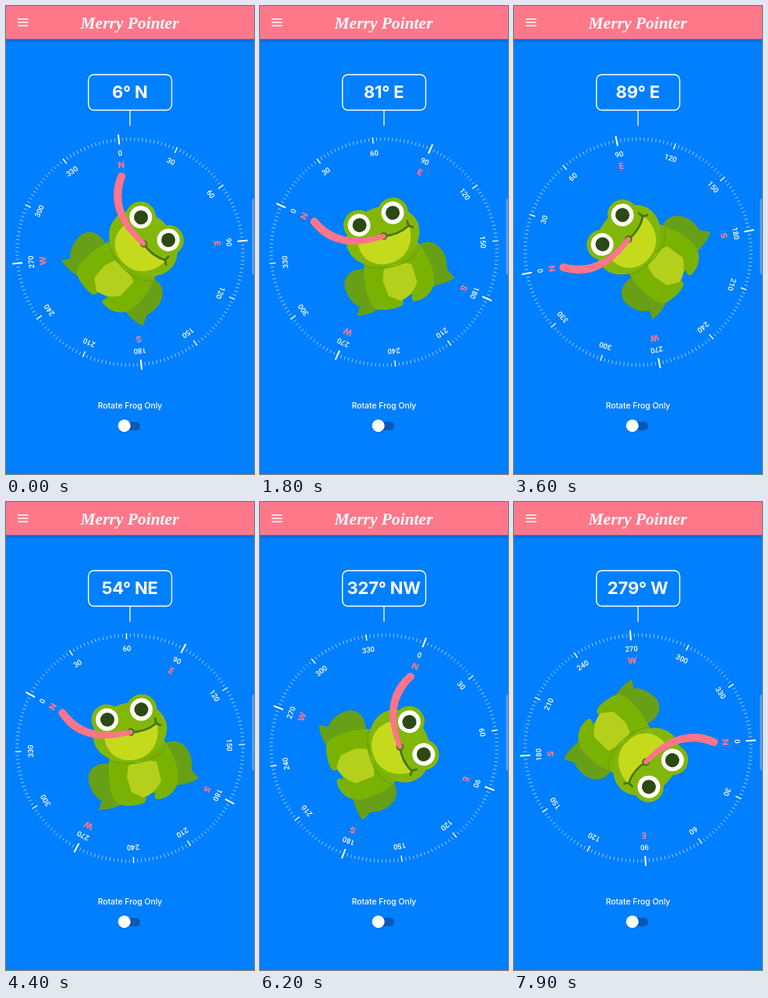
Animation of 318x600 px, one loop 8 s. Source, as an HTML page:

```html
<!DOCTYPE html>
<html lang="en">
<head>
<meta charset="utf-8">
<title>Merry Pointer</title>
<style>
html, body { margin: 0; width: 100%; height: 100%; overflow: hidden; background: #007fff; }
svg { display: block; width: 318px; height: 600px; }
text { text-anchor: middle; fill: #fff; font-family: Inter, sans-serif; }
.title { font: italic bold 21.5px "Liberation Serif", serif; }
.heading { font-size: 22px; font-weight: 700; letter-spacing: -.2px; }
.caption { font-size: 10.4px; font-weight: 500; }
.degree { font: 500 9.5px Roboto, sans-serif; }
.cardinal { font-size: 11px; font-weight: 800; fill: #ff758a; }
</style>
</head>
<body>
<svg viewBox="0 0 318 600">
  <defs>
    <linearGradient id="shade" x2="0" y2="1">
      <stop stop-color="#003f8c" stop-opacity=".55"/>
      <stop offset="1" stop-color="#003f8c" stop-opacity="0"/>
    </linearGradient>
  </defs>
  <rect width="318" height="600" fill="#007fff"/>
  <rect y="42" width="318" height="5" fill="url(#shade)"/>
  <rect width="318" height="42.5" fill="#ff788a"/>
  <path d="M15 16.8h13.5M15 21h13.5M15 25.2h13.5" stroke="#fff" stroke-width="1.5"/>
  <text class="title" x="158.5" y="28.5">Merry Pointer</text>

  <rect x="105.7" y="88" width="106.8" height="45.5" rx="7" fill="none" stroke="#fff" stroke-width="1.4"/>
  <path d="M159 134v19.5" stroke="#fff" stroke-width="1.3"/>
  <text class="heading" id="heading" x="158.7" y="118"></text>

  <g id="dial"></g>

  <g id="frog">
    <g fill="#679f16">
      <path d="M203 310C222 298 242 318 238 343L247 354C238 361 222 363 208 364Z"/>
      <path d="M135 336C115 332 101 345 107 362C110 374 118 381 123 383L119 394.500C131 395 144 391 154 384Z"/>
    </g>
    <path fill="#7ab204" d="M134 320C129 345 132 378 143 387C152 391 169 390 178 385C181 381 179 377 176 376L192 372C190 376 190 380 193 381C205 381 217 373 220 360C223 345 216 322 200 302Z"/>
    <path fill="#b5d01a" d="M157 338C168 331 182 330 193 333L199 357C194 368 186 376 176 379L161 372L155 352Z"/>
    <path fill="none" stroke="#6ba007" stroke-width="1.3" d="M132 331C146 337 164 337 180 332C192 328 202 322 205 312"/>
    <g fill="#82b70a">
      <ellipse cx="159" cy="295" rx="48" ry="37.500" transform="rotate(-15 159 295)"/>
      <circle cx="129" cy="279" r="19.500"/>
      <circle cx="174" cy="266" r="19.500"/>
    </g>
    <path fill="#c6da1c" d="M126 297Q165 303 194 284C198 310 185 329 160 331C140 332 126 318 126 297Z"/>
    <g fill="#fff"><circle cx="129.500" cy="279" r="14.500"/><circle cx="173.500" cy="266" r="14.500"/></g>
    <g fill="#2b4913"><circle cx="130" cy="279" r="9"/><circle cx="173.500" cy="266" r="9"/></g>
    <circle cx="160" cy="295" r="4.800" fill="#426f18"/>
    <path d="M160 295Q179 295 192.500 284M191.500 277.500Q191 285 198 286" fill="none" stroke="#47761a" stroke-width="2.800" stroke-linecap="round"/>
    <path fill="#ff758a" d="M75.500 266.500Q103 305 159 292A3.200 3.200 0 0 1 161 298Q97 316 68.500 273.500A5 5 0 0 1 75.500 266.500Z"/>
  </g>

  <text class="caption" x="159" y="516">Rotate Frog Only</text>
  <rect x="146" y="533" width="26" height="11" rx="5.500" fill="#0759b5"/>
  <circle cx="152" cy="539.300" r="8.200" fill="#003f8c" opacity=".35"/>
  <circle cx="151.700" cy="538.200" r="8" fill="#fff"/>
  <rect x="315.500" y="247" width="4" height="97" rx="1.500" fill="#5a9ff5"/>
</svg>
<script>
const LOOP = 8000, STEP = 100, LAG = 0.25, FROG_HEADING = 61.8;
const CX = 159, CY = 315.5;
const POINTS = ["N", "NE", "E", "SE", "S", "SW", "W", "NW"];
// time in s, heading on the dial, heading read by the sensor (the dial lags behind)
const KEYS = [
  [0, 5.7, 6], [1.8, 65.7, 81], [2.8, 112.9, 122], [4.4, 61.8, 54],
  [5.5, -2, -2], [6.9, -58.6, -72], [7.9, -86.2, -81]
];
const $ = id => document.getElementById(id);
const dial = $("dial"), frog = $("frog"), heading = $("heading");

function buildDial() {
  const tick = (outer, inner, width, alpha) =>
    `<path d="M0 ${-outer}V${-inner}" stroke="#fff" stroke-width="${width}" opacity="${alpha}"/>`;
  let out = "";
  for (let a = 0; a < 360; a += 2) {
    let mark = tick(147, 142.5, 0.9, 0.6);
    if (a % 90 === 0) {
      mark = tick(151.5, 138.5, 2, 1) +
        `<text class="cardinal" y="-108.5">${POINTS[a / 45]}</text>`;
    } else if (a % 30 === 0) {
      mark = tick(147.5, 139.5, 1.4, 1);
    }
    if (a % 30 === 0) mark += `<text class="degree" y="-124.2">${a}</text>`;
    out += `<g transform="rotate(${a})">${mark}</g>`;
  }
  dial.innerHTML = out;
}

// Cubic Hermite curve; returns the dial heading and its speed in degrees per second
function motion(t) {
  let i = 0;
  while (i < KEYS.length - 2 && t >= KEYS[i + 1][0]) i++;
  const [t0, p0, s0] = KEYS[i], [t1, p1, s1] = KEYS[i + 1];
  const d = t1 - t0, u = (t - t0) / d;
  const m0 = (s0 - p0) / LAG * d, m1 = (s1 - p1) / LAG * d;
  const a = 2 * (p0 - p1) + m0 + m1, b = 3 * (p1 - p0) - 2 * m0 - m1;
  return [((a * u + b) * u + m0) * u + p0, ((3 * a * u + 2 * b) * u + m0) / d];
}

function draw() {
  const ms = performance.now() % LOOP;
  const [angle, speed] = motion(Math.floor(ms / STEP) * STEP / 1000);
  const read = (Math.round(angle + LAG * speed) + 360) % 360;
  dial.setAttribute("transform", `translate(${CX} ${CY}) rotate(${-angle})`);
  frog.setAttribute("transform", `rotate(${FROG_HEADING - angle} ${CX} ${CY})`);
  heading.textContent = `${read}° ${POINTS[Math.round(read / 45) % 8]}`;
  requestAnimationFrame(draw);
}

buildDial();
draw();
</script>
</body>
</html>
```
